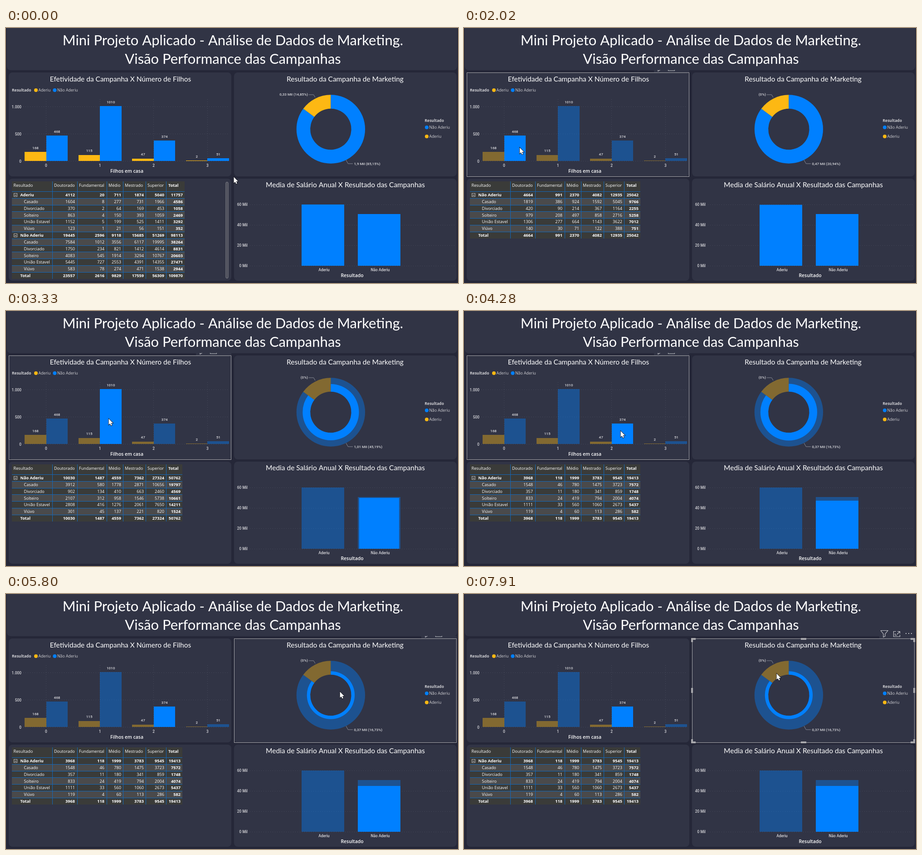
Animation of 997 by 562 pixels, one loop 8 s. Source, as an HTML page with a canvas:

```html
<!DOCTYPE html>
<html lang="pt-BR">
<head>
<meta charset="utf-8">
<style>
  html, body { margin: 0; height: 100%; overflow: hidden; background: #252738; }
  canvas { display: block; }
</style>
</head>
<body>
<canvas id="stage" width="997" height="562"></canvas>
<script>
const ctx = document.getElementById('stage').getContext('2d');
const LOOP = 8000, TRANSITION = 500, SELECT_AT = 7250;
const PAGE = '#252738', PANEL = '#313445', BLUE = '#0080ff', ORANGE = '#fdb813', DIM = 0.4;
const TITLE = 'Lato, sans-serif', SANS = '"Open Sans", "Noto Sans", sans-serif', DIN = 'Roboto, sans-serif';

const sum = list => list.reduce((a, b) => a + b, 0);
const mix = (a, b, k) => a + (b - a) * k;
const clamp = v => Math.min(1, Math.max(0, v));
const ease = k => k * k * (3 - 2 * k);

const SERIES = [['Aderiu', ORANGE], ['Não Aderiu', BLUE]];
const CHILDREN = [[168, 468], [115, 1010], [47, 374], [2, 51]];
const CLIENTS = [0, 1].map(s => sum(CHILDREN.map(pair => pair[s])));
const EVERYONE = sum(CLIENTS);
const SALARY = [60.3, 50.6];

const COLUMNS = [['Doutorado', 106, 152], ['Fundamental', 161, 217], ['Médio', 226, 254],
  ['Mestrado', 262, 304], ['Superior', 312, 349]];
const STATUS = ['Casado', 'Divorciado', 'Solteiro', 'União Estavel', 'Viúvo'];
const STATUS_EDGES = [0, 0.39, 0.48, 0.69, 0.97, 1];

const comma = (v, end) => v.toFixed(2).replace(/0$/, '').replace('.', ',') + end;
const label = count => count
  ? `${comma(count / 1000, ' Mil')} (${comma(count / EVERYONE * 100, '%')})` : '(0%)';

// Clicking a blue bar filters the other visuals to that number of children
const filterBy = (group, click, start, salary, totals) => ({
  group, click, start, salary: [0, salary], counts: [0, CHILDREN[group][1]],
  width: salary > SALARY[1] ? 0.5 : 1, groups: [['Não Aderiu', totals]],
});
const VIEWS = [
  { click: 0, start: 0, salary: SALARY, counts: CLIENTS, width: 1,
    groups: [['Aderiu', [4112, 20, 711, 1874, 5040]], ['Não Aderiu', [19445, 2596, 9118, 15685, 51269]]] },
  filterBy(0, 1780, 1990, 62.6, [4664, 991, 2370, 4082, 12935]),
  filterBy(1, 2850, 2950, 47.6, [10030, 1487, 4559, 7362, 27324]),
  filterBy(2, 4080, 4200, 45, [3968, 118, 1999, 3783, 9545]),
];

// Pointer moves: start, end, x, y
const MOVES = [[490, 1300, 108, 254], [1300, 1600, 119, 264], [1960, 2540, 226, 237], [3430, 3950, 345, 264],
  [4400, 4980, 309, 280], [5090, 5940, 769, 210], [5940, 6450, 632, 210], [6450, 6610, 646, 221],
  [6690, 7600, 689, 175]];

function pointerAt(t) {
  let x = 502, y = 328;
  for (const [start, end, toX, toY] of MOVES) {
    const k = ease(clamp((t - start) / (end - start)));
    x = mix(x, toX, k);
    y = mix(y, toY, k);
  }
  return [x, y];
}

function rect(x, y, w, h, color, alpha = 1) {
  const left = Math.round(x), top = Math.round(y);
  ctx.globalAlpha = alpha;
  ctx.fillStyle = color;
  ctx.fillRect(left, top, Math.round(x + w) - left, Math.round(y + h) - top);
  ctx.globalAlpha = 1;
}

// y is the middle of the capital letters
function text(str, x, y, size, { align = 'left', weight = 500, font = SANS, color = '#fff' } = {}) {
  ctx.font = `${weight} ${size}px ${font}`;
  ctx.textAlign = align;
  ctx.fillStyle = color;
  ctx.fillText(str, x, y + size * 0.357);
}
const axisText = (str, x, y, align = 'center', size = 8.4) =>
  text(str, x, y, size, { align, font: DIN, color: '#d8d8dc' });
const heading = (str, x, y, size = 15.5) =>
  text(str, x, y, size, { align: 'center', weight: 400, font: TITLE });
const axisTitle = (str, x, y) => text(str, x, y, 10.4, { align: 'center', weight: 600 });

function line(points, color, width = 1, dash = []) {
  ctx.beginPath();
  points.forEach(([x, y]) => ctx.lineTo(x, y));
  ctx.strokeStyle = color;
  ctx.lineWidth = width;
  ctx.setLineDash(dash);
  ctx.stroke();
  ctx.setLineDash([]);
}
const grid = (x1, y1, x2, y2) => line([[x1, y1], [x2, y2]], '#4b4e5f', 1, [1, 4]);

function roundRect(x, y, w, h, r, color) {
  ctx.beginPath();
  ctx.roundRect(x, y, w, h, r);
  ctx.fillStyle = color;
  ctx.fill();
}

function legendItem([name, color], x, y) {
  ctx.beginPath();
  ctx.arc(x, y, 4, 0, 7);
  ctx.fillStyle = color;
  ctx.fill();
  text(name, x + 5.5, y, 8.7, { color: '#d0d0d4' });
}
const legendTitle = (x, y) => text('Resultado', x, y, 8.5, { weight: 700, color: '#d0d0d4' });

function childrenChart(selected) {
  heading('Efetividade da Campanha X Número de Filhos', 252.5, 112);
  legendTitle(13, 137);
  legendItem(SERIES[0], 66, 137);
  legendItem(SERIES[1], 107.5, 137);
  ['0', '500', '1.000'].forEach((name, i) => {
    grid(38, 293.5 - 60 * i, 492, 293.5 - 60 * i);
    axisText(name, 34, 294 - 60 * i, 'right');
  });
  CHILDREN.forEach((pair, g) => {
    const mid = 88.5 + 118.6 * g;
    grid(Math.floor(mid) + 0.5, 157, Math.floor(mid) + 0.5, 293);
    pair.forEach((value, s) => {
      const h = Math.max(1, value * 0.12), x = mid + (s - 1) * 47.5;
      const lit = selected === undefined || (selected === g && s === 1);
      rect(x, 293.3 - h, 47.5, h, SERIES[s][1], lit ? 1 : DIM);
      axisText(value, x + 24, 284 - h, 'center', 8.1);
    });
    axisText(g, mid, 303);
  });
  axisTitle('Filhos em casa', 266.5, 315);
}

function ring(from, to, outer, color, alpha) {
  ctx.beginPath();
  ctx.arc(716.4, 223, outer, from, to);
  ctx.arc(716.4, 223, 45.3, to, from, true);
  ctx.globalAlpha = alpha;
  ctx.fillStyle = color;
  ctx.fill();
  ctx.globalAlpha = 1;
}

function donut(view, counts, filtered) {
  heading('Resultado da Campanha de Marketing', 748, 112);
  const top = -Math.PI / 2, split = top - CLIENTS[0] / EVERYONE * 2 * Math.PI;
  SERIES.forEach(([, color], s) => {
    const [from, to] = s ? [top, split + 2 * Math.PI] : [split, top];
    ring(from, to, 75.7, color, filtered ? DIM : 1);
    // The highlighted share fills the slice by area
    if (filtered) ring(from, to, Math.sqrt(mix(45.3 ** 2, 75.7 ** 2, counts[s] / CLIENTS[s])), color, 1);
  });
  line([[668, 147], [678.5, 147], [682, 153]], '#888b96');
  line([[750, 291], [754.5, 299], [765, 299]], '#888b96');
  axisText(label(view.counts[0]), 666, 146.5, 'right', 8.1);
  axisText(label(view.counts[1]), 767.5, 299, 'left', 8.1);
  legendTitle(923.5, 203.5);
  legendItem(SERIES[1], 928, 219);
  legendItem(SERIES[0], 928, 239);
}

function salaryChart(salary, width, filtered) {
  heading('Media de Salário Anual X Resultado das Campanhas', 748.5, 345.5);
  for (let i = 0; i < 4; i++) {
    grid(538, 524.5 - 45 * i, 990, 524.5 - 45 * i);
    axisText(20 * i + ' Mil', 533, 524.5 - 45 * i, 'right');
  }
  SERIES.forEach(([name], s) => {
    const mid = 699 + 124 * s, base = SALARY[s] * 2.25, h = salary[s] * 2.25;
    rect(mid - 47, 524.2 - base, 94, base, BLUE, filtered ? DIM : 1);
    if (filtered) rect(mid - 47 * width, 524.2 - h, 94 * width, h, BLUE);
    axisText(name, mid + 2.5, 533.5);
  });
  axisTitle('Resultado', 763.5, 545.5);
}

function tableRows(groups) {
  const rows = [];
  for (const [name, cells] of groups) {
    rows.push({ name, cells, bold: true, group: true });
    STATUS.forEach((status, i) => rows.push({
      name: status,
      cells: cells.map(v => Math.round(v * STATUS_EDGES[i + 1]) - Math.round(v * STATUS_EDGES[i])),
    }));
  }
  const totals = COLUMNS.map((_, c) => sum(groups.map(g => g[1][c])));
  return [...rows, { name: 'Total', cells: totals, bold: true }];
}

function table({ groups }) {
  const rows = tableRows(groups), full = groups.length > 1;
  const right = full ? 394 : 389, rowH = 14.83, bottom = 360 + rows.length * rowH;
  rect(13, 338, right - 13, 22, '#3a3b39');
  text('Resultado', 16.5, 347, 9.2);
  COLUMNS.forEach(([name, x]) => text(name, x, 347, 9));
  text('Total', 358, 347, 9.1, { weight: 700 });

  rows.forEach(({ name, cells, bold, group }, i) => {
    const top = 360 + i * rowH, y = top + 7.8, weight = bold ? 700 : 500;
    rect(13, top, right - 13, rowH, i % 2 ? '#4a4a4b' : '#3a3b39');
    rect(13, top, right - 13, 1, '#1268bb');
    if (group) {
      ctx.strokeStyle = '#b8b8b8';
      ctx.lineWidth = 1;
      ctx.strokeRect(17.5, Math.round(y) - 3.5, 7, 7);
      rect(19, Math.round(y), 4, 1, '#ddd');
    }
    text(name, bold ? 31.5 : 39.5, y, 9.1, { weight });
    cells.forEach((v, c) => v && text(v, COLUMNS[c][2], y, 9.2, { align: 'right', weight }));
    text(sum(cells), right - 4, y, 9.2, { align: 'right', weight: 700 });
  });
  COLUMNS.forEach(([, x]) => rect(x - 4, 338, 1, bottom - 338, '#1268bb'));
  rect(353, 338, 1, bottom - 338, '#1268bb');

  if (full) {
    roundRect(485, 339.5, 5, 212, 2.5, '#4a4c58');
    ctx.strokeStyle = '#85868e';
    ctx.stroke();
  }
}

// Visual header icons; only their lower edge shows until the visual is selected
function headerIcons(right, selected) {
  const stroke = points => line(points.map(([x, y]) => [right + x, y]), '#c4c5ca', 1.2);
  ctx.save();
  ctx.beginPath();
  ctx.rect(right - 78, selected ? 76 : 92.5, 78, 22);
  ctx.clip();
  rect(right - 78, 76, 78, 22, PANEL);
  stroke([[-75, 80.5], [-59, 80.5], [-65, 88], [-65, 93], [-69, 95], [-69, 88], [-75, 80.5]]);
  stroke([[-41, 82.5], [-46.5, 82.5], [-46.5, 94], [-32.5, 94], [-32.5, 90]]);
  stroke([[-38, 82.5], [-32.5, 82.5], [-32.5, 87]]);
  stroke([[-33, 83], [-39, 89]]);
  stroke([[-43, 87], [-43, 91], [-39, 91]]);
  for (let x = -20; x < -7; x += 6) rect(right + x, 86, 2, 2, '#c4c5ca');
  ctx.restore();
}

function frame({ x, y, w, h }, selected) {
  const gray = '#a9a9ad';
  headerIcons(x + w, selected);
  ctx.strokeStyle = gray;
  ctx.lineWidth = 1;
  ctx.strokeRect(x + 0.5, y + 0.5, w - 1, h);
  if (!selected) return;
  for (const k of [0, 1]) {
    const barX = x - 2 + k * (w - 1), barY = y - 1 + k * (h - 1);
    for (const m of [0, 1]) {
      rect(x - 2 + m * (w - 7), barY, 10, 4, gray);
      rect(barX, y - 1 + m * (h - 6), 4, 9, gray);
    }
    rect(x + w / 2 - 6, barY, 12, 4, gray);
    rect(barX, y + h / 2 - 6, 4, 11, gray);
  }
}

function pointer(x, y) {
  ctx.beginPath();
  [[0, 0], [0, 13], [3, 10.3], [5, 15], [7.2, 14], [5.2, 9.5], [9.3, 9.3]]
    .forEach(([dx, dy]) => ctx.lineTo(x + 0.6 + dx, y + 0.6 + dy));
  ctx.closePath();
  ctx.strokeStyle = '#15161e';
  ctx.lineWidth = 1.6;
  ctx.stroke();
  ctx.fillStyle = '#fff';
  ctx.fill();
}

const PANELS = [];
for (const [y, h] of [[98, 229], [332, 225]])
  for (const x of [6, 503]) PANELS.push({ x, y, w: 491, h });

function draw(t) {
  const current = VIEWS.filter(v => v.start <= t).length - 1;
  const view = VIEWS[current], before = VIEWS[Math.max(0, current - 1)];
  const k = ease(clamp((t - view.start) / TRANSITION));
  const between = key => [0, 1].map(s => mix(before[key][s], view[key][s], k));
  const selected = VIEWS.filter(v => v.click <= t).pop().group;
  const [px, py] = pointerAt(t);

  rect(0, 0, 997, 562, PAGE);
  roundRect(2, -10, 993, 103, 8, PANEL);
  PANELS.forEach(({ x, y, w, h }) => roundRect(x, y, w, h, 8, PANEL));
  heading('Mini Projeto Aplicado - Análise de Dados de Marketing.', 500.5, 27, 31);
  heading('Visão Performance das Campanhas', 500.5, 68, 31);

  childrenChart(selected);
  donut(view, between('counts'), current > 0);
  table(view);
  salaryChart(between('salary'), mix(before.width, view.width, k), current > 0);

  const hovered = PANELS.slice(0, 2)
    .find(({ x, y, w, h }) => px >= x && px < x + w && py >= y && py < y + h);
  if (hovered) frame(hovered, t >= SELECT_AT);
  pointer(px, py);
}

function tick() {
  draw(performance.now() % LOOP);
  requestAnimationFrame(tick);
}
tick();
</script>
</body>
</html>
```
